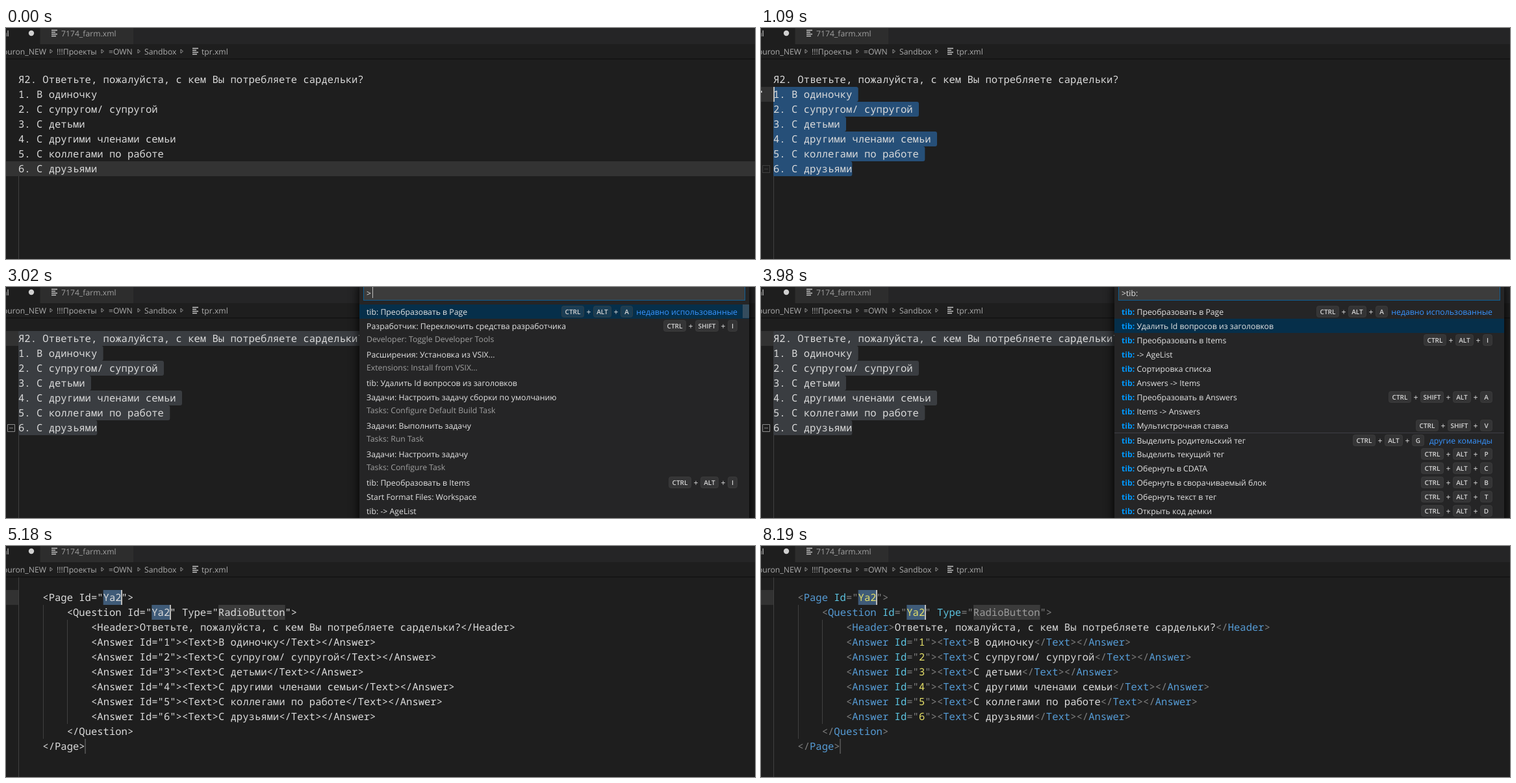
An HTML page that plays this animation: 1153 px wide and 357 px high, repeating every 8320 ms.

```html
<!DOCTYPE html>
<html lang="ru">
<head>
<meta charset="utf-8">
<title>Survey text to XML</title>
<style>
  html, body { margin: 0; width: 100%; height: 100%; overflow: hidden; background: #1e1e1e; }
  svg { display: block; }
  text { white-space: pre; text-rendering: geometricPrecision; fill: #dcdcdc; }
  .code { font: 500 15.556px "Noto Sans Mono", monospace; }
  .ui { font: 12.27px "Open Sans", "Noto Sans", sans-serif; fill: #e4e4e4; }
  .crumb { font-size: 12.2px; fill: #acacac; }
  .sub { fill: #a0a0a0; }
  .link { fill: #3794ff; }
  .hit { font-weight: 700; fill: #0097fb; }
  .key { font-size: 10px; font-weight: 600; fill: #d6d6d6; text-anchor: middle; }
  .plus { text-anchor: middle; }
  .end { text-anchor: end; }
  .mark { fill: #808080; }
  .tag { fill: #569cd6; }
  .attr { fill: #5cc3e0; }
  .val { fill: #e6e069; }
  .dim { fill: #9c9c9c; }
  .plain tspan { fill: #dcdcdc; }
</style>
</head>
<body>
<script>
const LOOP = 8320, LEFT = 19, TOP = 68, ROW = 23, CH = 28 / 3;

const lines = [
  'Я2. Ответьте, пожалуйста, с кем Вы потребляете сардельки?',
  '1. В одиночку',
  '2. С супругом/ супругой',
  '3. С детьми',
  '4. С другими членами семьи',
  '5. С коллегами по работе',
  '6. С друзьями'
];

// key codes: C = CTRL, S = SHIFT, A = ALT; the last part is the letter
const recent = [
  ['tib: Преобразовать в Page', 'C A A', 'недавно использованные', 973],
  ['Разработчик: Переключить средства разработчика', 'C S I', '', 0, 'Developer: Toggle Developer Tools'],
  ['Расширения: Установка из VSIX...', '', '', 0, 'Extensions: Install from VSIX...'],
  ['tib: Удалить Id вопросов из заголовков'],
  ['Задачи: Настроить задачу сборки по умолчанию', '', '', 0, 'Tasks: Configure Default Build Task'],
  ['Задачи: Выполнить задачу', '', '', 0, 'Tasks: Run Task'],
  ['Задачи: Настроить задачу', '', '', 0, 'Tasks: Configure Task'],
  ['tib: Преобразовать в Items', 'C A I'],
  ['Start Format Files: Workspace'],
  ['tib: -> AgeList']
];
const found = [
  recent[0],
  recent[3],
  recent[7],
  recent[9],
  ['tib: Сортировка списка'],
  ['tib: Answers -> Items'],
  ['tib: Преобразовать в Answers', 'C S A A'],
  ['tib: Items -> Answers'],
  ['tib: Мультистрочная ставка', 'C S V'],
  ['tib: Выделить родительский тег', 'C A G', 'другие команды', 1029],
  ['tib: Выделить текущий тег', 'C A P'],
  ['tib: Обернуть в CDATA', 'C A C'],
  ['tib: Обернуть в сворачиваемый блок', 'C A B'],
  ['tib: Обернуть текст в тег', 'C A T'],
  ['tib: Открыть код демки', 'C A D']
];

const esc = s => s.replace(/&/g, '&amp;').replace(/</g, '&lt;').replace(/>/g, '&gt;');
const span = (cls, s) => `<tspan class="${cls}">${esc(s)}</tspan>`;
const text = (x, y, cls, body) => `<text x="${x}" y="${y}" class="${cls}">${body}</text>`;
const rect = (x, y, w, h, fill, rx = 0) =>
  `<rect x="${x}" y="${y}" width="${w}" height="${h}" rx="${rx}" fill="${fill}"/>`;
const rowY = i => TOP + i * ROW;
const colX = c => LEFT + c * CH;

// body is visible only inside the given [from, to] spans
const on = (spans, body, opacity = 1) =>
  `<g data-on="${spans.map(s => s.join(' ')).join()}" opacity="${opacity}">${body}</g>`;
const at = (from, to, body, opacity) => on([[from, to]], body, opacity);

const caret = (x, y, h = ROW, w = 2) => rect(x, y, w, h, '#bdbdbb');
const gutter = i => rect(0, rowY(i), LEFT, ROW, '#323232');
const guide = (x, y, end) => rect(x, y, 1, end - y, '#404040');

function fold(i) {
  const y = rowY(i) + 6.5;
  return `<path d="M2.5 ${y}h11v11h-11zM5 ${y + 5.5}h6" fill="none" stroke="#8c8c8c"/>`;
}

function select(first, fill) {
  let out = rect(LEFT, rowY(first), 6, (7 - first) * ROW, fill, 1);
  for (let i = first; i < 7; i++) {
    const n = lines[i].length + (i < 6 ? 1 : 0);
    out += rect(LEFT, rowY(i), n * CH, ROW, fill, 3);
  }
  return out;
}

const beam = (x, y) =>
  `<path d="M${x - 4} ${y - 8.5}h3l1 1 1-1h3M${x} ${y - 8}v16M${x - 4} ${y + 8.5}h3l1-1 1 1h3" fill="none" stroke="#d8d8d8"/>`;
const arrow = (x, y) =>
  `<path d="M${x} ${y}v16l4-4 3 6 2-1-3-6h6z" fill="#fff" stroke="#000"/>`;

const fileIcon = (x, y) =>
  `<path d="M${x} ${y + .5}h9M${x} ${y + 3.5}h6M${x} ${y + 6.5}h9M${x} ${y + 9.5}h7" stroke="#c5c5c5" stroke-width="1.3"/>`;

function chrome() {
  const crumbs = [[78, '!!!Проекты'], [158, '=OWN'], [213, 'Sandbox'], [301, 'tpr.xml']];
  return rect(0, 0, 1153, 25, '#252526') + rect(0, 0, 52, 25, '#1e1e1e') + rect(53, 0, 143, 25, '#2d2d2d') +
    text(4.5, 13, 'ui end', 'xml') + '<circle cx="39" cy="8" r="4.2" fill="#d0d0d0"/>' +
    fileIcon(70, 3) + text(85, 13, 'ui crumb sub', '7174_farm.xml') +
    text(62, 41, 'ui crumb end', 'buron_NEW') +
    crumbs.map(([x, s]) => text(x, 41, 'ui crumb', s)).join('') +
    [68, 147, 203, 269].map(x =>
      `<path d="M${x} 33l3.5 3-3.5 3z" fill="none" stroke="#a0a0a0" stroke-width=".9"/>`).join('') +
    fileIcon(287, 31) + rect(0, 47, 1153, 1.5, '#131313');
}

function keys(codes, right, y) {
  const known = { C: ['CTRL', 35], S: ['SHIFT', 36], A: ['ALT', 28] };
  let out = '';
  codes.split(' ').reverse().forEach((k, i) => {
    const [name, w] = i ? known[k] : [k, k === 'I' ? 15 : 19];
    if (i) {
      out += text(right - 7, y + 4.5, 'ui plus', '+');
      right -= 14;
    }
    out += `<rect x="${right - w + .5}" y="${y - 8.5}" width="${w - 1}" height="17" rx="3" fill="#808080" fill-opacity=".17" stroke="#444" stroke-opacity=".6"/>` +
      text(right - w / 2, y + 3.6, 'ui key', name);
    right -= w;
  });
  return out;
}

function list(items, mark) {
  let y = 38;
  return items.map(([name, codes, note, noteX, sub]) => {
    const ty = y + (mark && note && y > 38 ? 1 : 0);
    const label = mark ? span('hit', 'tib:') + esc(name.slice(4)) : esc(name);
    const out = text(555, ty + 4.5, 'ui', label) +
      (codes ? keys(codes, note ? noteX - 8 : 1126, ty) : '') +
      (note ? text(1126, ty + 4.5, 'ui link end', note) : '') +
      (sub ? text(555, y + 24.5, 'ui sub', sub) : '');
    y += sub ? 44 : 22;
    return out;
  }).join('');
}

function palette() {
  const focus = i => rect(544, 27 + i * 22, 600, 22, '#062f4a');
  return '<rect x="544" y="-10" width="600" height="380" fill="#252526" style="filter:drop-shadow(0 5px 8px #000)"/>' +
    '<rect x="550.5" y="-5.5" width="587" height="26" fill="#3c3c3c" stroke="#0e5f94"/>' +
    on([[3020, 3980], [4370, 5180]], focus(0)) + at(3980, 4370, focus(1)) +
    at(3020, 3140, text(555, 14, 'ui', '&gt;') + caret(564, 0, 17, 1) +
      list(recent) + rect(1134, 27, 10, 21, '#79797966')) +
    at(3140, 5180, text(555, 14, 'ui', '&gt;tib: ') + rect(544, 225, 600, 1, '#3f3f46') + list(found, true)) +
    on([[3140, 3700], [4120, 4620], [5060, 5180]], caret(585, 0, 17, 1));
}

function survey() {
  const i = lines.length - 1;
  return at(0, 820, rect(0, rowY(i), 1153, ROW, '#333')) + guide(LEFT, 229, 357) +
    at(820, 940, gutter(6) + rect(colX(4), rowY(i), 9 * CH, ROW, '#264f78', 3)) +
    at(940, 1090, gutter(4) + select(4, '#264f78')) +
    at(1090, 1210, gutter(1) + select(1, '#264f78')) +
    at(1210, 5180, gutter(0)) +
    at(1210, 3020, select(0, '#264f78')) +
    at(3020, 5180, select(0, '#3a3d41')) +
    lines.map((s, n) => text(LEFT, rowY(n) + 17, 'code', esc(s))).join('') +
    at(280, 820, caret(140, rowY(6))) +
    at(820, 940, caret(colX(4), rowY(6))) +
    at(940, 1090, caret(LEFT, rowY(4))) +
    at(1090, 1210, caret(LEFT, rowY(1)) + rect(0, 97, 1.5, 3, '#ccc')) +
    on([[1210, 1640], [2190, 2620]], caret(LEFT, rowY(0))) +
    at(1090, 1210, fold(6), .3) + at(1210, 1360, fold(6), .8) + at(1360, 5180, fold(6)) +
    at(280, 430, beam(317, 270)) + at(430, 560, beam(285, 251)) + at(560, 700, beam(246, 232)) +
    at(700, 820, beam(146, 229)) + at(820, 940, beam(57, 217));
}

function xmlRows() {
  const answers = lines.slice(1).map((s, i) =>
    [12, `<Answer Id="${i + 1}"><Text>${s.slice(3)}</Text></Answer>`]);
  return [
    [4, '<Page Id="Ya2">'],
    [8, '<Question Id="Ya2" Type="RadioButton">'],
    [12, `<Header>${lines[0].slice(4)}</Header>`],
    ...answers,
    [8, '</Question>'],
    [4, '</Page>']
  ];
}

function paint(s) {
  return s.replace(/(<\/?)(\w+)|( \w+)(=")(\w+)(")|>/g, (m, open, tag, attr, eq, val, quote) =>
    open ? span('mark', open) + span('tag', tag)
      : attr ? span('attr', attr) + span('mark', eq) +
        span(val === 'RadioButton' ? 'dim' : 'val', val) + span('mark', quote)
      : span('mark', m));
}

function xml() {
  const code = xmlRows().map(([col, s], i) => text(colX(col), rowY(i) + 17, 'code', paint(s))).join('');
  const folds = fold(0) + fold(1);
  return gutter(0) + guide(LEFT, 48, 357) + guide(57, rowY(1), rowY(10)) + guide(94, rowY(2), rowY(9)) +
    rect(colX(14), rowY(0), 3 * CH, ROW, '#3f5b78') +
    rect(colX(22), rowY(1), 3 * CH, ROW, '#3f5b78') +
    rect(colX(33), rowY(1), 11 * CH, ROW, '#3a3a3a') +
    at(5180, 5330, `<g class="plain">${code}</g>`) + at(5330, LOOP, code) +
    rect(121.5, rowY(10), 1, ROW, '#777') +
    on([[5180, 5720], [6160, 6700], [7130, 7690], [8190, LOOP]],
      caret(177, rowY(0)) + caret(252, rowY(1))) +
    at(5330, 5450, folds, .5) + at(5450, 6460, folds) +
    at(6460, 6580, folds, .7) + at(6580, 6700, folds, .3) +
    at(6320, 6460, arrow(224, -8));
}

document.body.innerHTML =
  `<svg width="1153" height="357" viewBox="0 0 1153 357">${rect(0, 0, 1153, 357, '#1e1e1e')}` +
  at(0, 5180, survey()) + at(5180, LOOP, xml()) + chrome() + at(3020, 5180, palette()) + '</svg>';

const parts = [...document.querySelectorAll('[data-on]')].map(el => ({
  el, spans: el.dataset.on.split(',').map(s => s.split(' ').map(Number))
}));

const start = performance.now();
function tick() {
  const t = Math.max(0, performance.now() - start) % LOOP;
  for (const { el, spans } of parts)
    el.style.display = spans.some(([a, b]) => t >= a && t < b) ? '' : 'none';
  requestAnimationFrame(tick);
}
tick();
</script>
</body>
</html>
```
